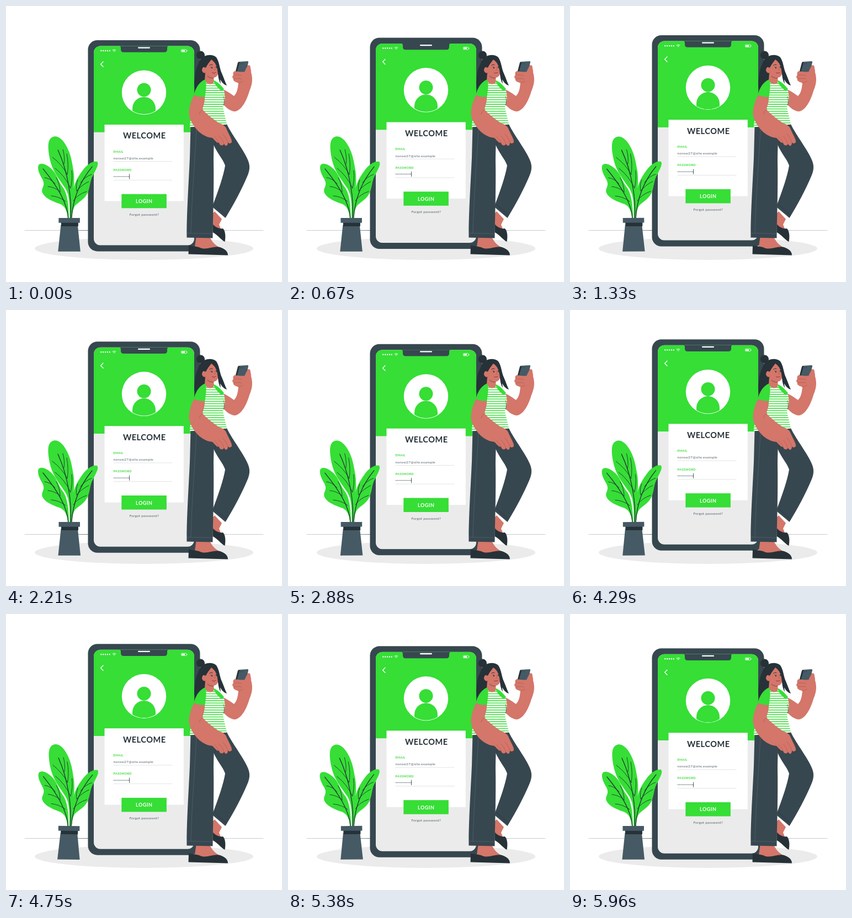
These frames come from a looping animation (500 by 500 pixels, 6000 ms). An HTML page:

```html
<!DOCTYPE html>
<html lang="en">
<head>
<meta charset="utf-8">
<title>Login</title>
<style>
  html, body { margin: 0; width: 100%; height: 100%; overflow: hidden; background: #fff; }
  svg { display: block; width: 100%; height: 100%; }
  text { font-family: Lato, "Open Sans", sans-serif; }
  .green { fill: #36de36; }
  .navy { fill: #37474f; }
  .ink { fill: #263238; }
  .skin { fill: #d4766a; }
  .slate { fill: #455a64; }
  .label { font-size: 5.5px; font-weight: 700; letter-spacing: .3px; }
  .line { fill: none; stroke-linecap: round; stroke-linejoin: round; }
  .vein { stroke: #263238; stroke-width: .9; }
  .crease { stroke: #a9564c; stroke-width: .6; }
  .seam { stroke: #263238; stroke-width: .6; }
  .white { stroke: #fff; }
</style>
</head>
<body>
<svg viewBox="0 0 500 500">
  <defs>
    <clipPath id="screen"><rect x="159" y="72.7" width="182" height="361" rx="12"/></clipPath>
    <clipPath id="disc"><circle cx="250" cy="157" r="39.4"/></clipPath>
    <pattern id="stripes" width="10" height="4.2" patternUnits="userSpaceOnUse">
      <rect width="10" height="4.2" fill="#fff"/>
      <rect class="green" y="1" width="10" height="1.5"/>
    </pattern>
  </defs>

  <ellipse cx="250" cy="439.3" rx="198" ry="20.6" fill="#ebebeb"/>
  <ellipse class="ink" cx="250" cy="406.4" rx="218.4" ry=".3"/>

  <g id="device">
    <rect class="navy" x="148.5" y="62.2" width="203" height="382.5" rx="17"/>
    <g clip-path="url(#screen)">
      <rect x="159" y="72" width="182" height="362" fill="#ebebeb"/>
      <rect class="green" x="159" y="72" width="182" height="157"/>
      <path class="navy" d="M204 72Q208 72.5 208 76V79Q208 84 213 84H287Q292 84 292 79V76Q292 72.5 296 72Z"/>
    </g>
    <rect x="239" y="74.7" width="22" height="2.3" rx="1.1" fill="#fff"/>
    <path class="line white" stroke-width="2.4" stroke-dasharray="0 3.85" d="M172.3 81.3H188"/>
    <path class="line white" stroke-width=".9" d="M193 80.2Q196 77.9 199 80.2M194.5 81.8Q196 80.6 197.5 81.8M196 83.2V83.3"/>
    <rect x="317.5" y="79.2" width="9.6" height="4.4" rx="1" fill="none" stroke="#fff" stroke-width=".7"/>
    <path fill="#fff" d="M318.4 80.1H324V82.8H318.4ZM327.5 80.4H328.4V82.4H327.5Z"/>
    <path class="line white" stroke-width="1.4" d="M176 101.2L171.6 105.7L176 110.2"/>

    <circle cx="250" cy="157" r="40.2" fill="#fff"/>
    <g class="green" clip-path="url(#disc)">
      <circle cx="250" cy="152.3" r="12.5"/>
      <path d="M229 200V186A21 21 0 0 1 271 186V200Z"/>
    </g>

    <rect x="178.5" y="215.2" width="143.3" height="138.4" fill="#fff"/>
    <text class="ink" x="250.8" y="240.7" text-anchor="middle" font-size="14.6" font-weight="700" letter-spacing=".5">WELCOME</text>
    <text class="label green" x="194.6" y="266">EMAIL</text>
    <text x="194.6" y="278.3" font-size="6.5" letter-spacing=".3" fill="#55636a">noraw27@site.example</text>
    <text class="label green" x="194.6" y="299.4">PASSWORD</text>
    <path class="line" stroke="#37474f" stroke-width="1.5" stroke-dasharray="0 2.65" d="M195.8 309.3H222.5"/>
    <path class="line" stroke="#263238" stroke-width=".8" d="M223.5 305V313.5"/>
    <path class="line" stroke="#c4c8ca" stroke-width=".5" d="M195 281.9H301M195 315.7H301"/>
    <rect class="green" x="209.3" y="341" width="81.6" height="25.5"/>
    <text x="250.3" y="357.5" text-anchor="middle" font-size="9" font-weight="700" letter-spacing=".5" fill="#fff">LOGIN</text>
    <text x="250.3" y="380.2" text-anchor="middle" font-size="6.5" letter-spacing=".2" fill="#55636a">Forgot password?</text>
  </g>

  <g id="plant">
    <g class="green">
      <path d="M112 385C111 372 108 364 99 359C86 354 70 349 65.5 337C64 328 72 326 66 314C60 304 55 292 60 287C68 282 85 294 91 307C95 315 98 322 104 330C112 342 114 365 114 385Z"/>
      <path d="M118 385C118 368 117 352 121 336C124 320 130 310 138 299C145 288 157 280 165 282C169 286 163 296 158 306C152 316 153 324 149 336C144 350 131 355 125 362C121 368 120 376 119.500 385Z"/>
      <path d="M115.500 385C115 362 116 345 108 331C99 317 84 301 79 276C76 260 74 243 83 238C91 233 101 240 107 250C116 264 119 279 121 292C124 306 124 320 122 333C119 350 118 368 118 385Z"/>
    </g>
    <g class="line vein">
      <path stroke-width="1.3" d="M113 385C111 356 93 327 67 295M116.800 385C120 350 112 300 94 261M118.800 385C121 350 132 320 156 291"/>
      <path d="M108 354Q96 345 82 344M99 337Q88 328 76 327M89 322Q80 312 70 311M98 335Q97 321 91 311"/>
      <path d="M116.800 330Q107 308 89 294M111 305Q101 287 84 274M116.800 330Q121 316 119 298M111 305Q114 288 110 268M105 286Q107 275 103 260"/>
      <path d="M122 353Q130 341 146 336M128 335Q137 324 150 318M135 320Q143 309 155 305M128 335Q126 325 130 315"/>
    </g>
    <path class="slate" d="M99.500 397H130L135 444.700H94.500Z"/>
    <rect class="ink" x="100" y="392" width="31" height="7"/>
    <rect class="slate" x="95.500" y="384" width="38.500" height="8.700"/>
  </g>

  <g id="woman">
    <!-- far leg -->
    <path class="skin" d="M378 372L391 386L386 396L391 408L375 398L374 376Z"/>
    <path class="ink" d="M374.500 395C381 403 390 404 393 403C398 408 398 419 396.500 427C391 425 384 415 374.500 410Z"/>
    <path class="navy" d="M350 218L400 214C410 235 432 262 439 281C443 292 441 300 436 311C427 332 412 361 397.500 384L375 365V360C384 336 394 308 397 289C393 277 382 266 376 251L350 245Z"/>
    <path class="line seam" d="M376 358L400 379.500M378 252Q382 244 377 232"/>

    <!-- near leg -->
    <path class="skin" d="M345 415H371L370 420C374 429 382 435 389 439L360 444L342 436Z"/>
    <path class="ink" d="M331 433.500C340 436 346 435 352 438C363 443 377 434 388 437C396 440 402 444 402 451.500L330.500 449.500Z"/>
    <path class="navy" d="M334.500 218L379 215C377 240 376 260 376 280C377 330 375 380 374.500 420.500L327.500 419.500C327 380 331 320 333 275Z"/>
    <path class="line" stroke="#607078" stroke-width=".5" d="M345 222C342 280 336 360 335 411M328 411.500L374.500 412.500"/>

    <!-- back hair -->
    <circle class="ink" cx="352.500" cy="89" r="7.600"/>
    <path class="ink" d="M357 95C346 105 343 116 342 130C340 139 341 147 343 153C350 149 352 142 361 134L366 100Z"/>

    <!-- raised arm -->
    <path class="skin" d="M390 150C400 153 407 159 413 163C419 157 420 149 421 139C415 138 411 135 412 132C409 129 410 126 413 125C411 121 413 118 418 118L434 119L437 108C441 106 444 112 444 120C447 131 447 140 441 154C436 171 427 189 415 191C406 191 397 183 390 174Z"/>
    <path class="slate" d="M422 101L437.500 100Q439.500 100 439 102L435.500 117Q435 119 433 119L417.500 120.500Q415.500 120.500 416 118.500L420 103Q420.500 101 422 101Z"/>
    <path class="ink" d="M422 101L420 103L416 118.500L417.500 120.500L419 117L423 103Z"/>
    <path class="line" stroke="#263238" stroke-width="1.300" d="M425 104.500H425.100M428.500 104.200H428.600"/>
    <path class="skin" d="M432 120C434 115 437 108 440 107C444 107 443 116 443 121L434 137Q426 140 418 138Q411 136 412 132Q409 129 412 125Q410 121 414 118Q420 119 432 120Z"/>
    <path class="line crease" d="M413 125Q420 124 427 126M413 132Q420 130 427 132M419 138.500Q425 140 429 136"/>

    <!-- neck and top -->
    <path fill="url(#stripes)" d="M358 136L376 136L394 150C398 163 397 173 393 183C395 195 399 206 400 214.500L333 219.500C333 205 338 193 350 185C357 176 359 160 357 140Z"/>
    <path class="green" d="M375 134C383 137 389 143 395 150.500L391 154C385 150 379 144 375 134Z"/>
    <path class="skin" d="M361 121L377 127L376 139C371 144 363 141 360 135Z"/>
    <path class="line seam" d="M394 164Q397 172 394 180"/>

    <!-- resting arm -->
    <path class="skin" d="M342 158L360 161C361 172 358 180 356 187C362 195 374 204 386 212C393 214 399 219 400 224C404 233 410 242 409 247C406 250 403 249 402 247C402 254 398 255 395 250C391 255 387 252 386 248C381 248 378 243 374 239C362 238 350 231 341 218C333 207 330 197 332 188C333 177 338 167 342 158Z"/>
    <path class="line crease" d="M402 247Q399 238 393 232M395 250Q392 241 386 235M386 248Q384 242 378 237M356 187Q352 190 350 196"/>
    <path class="green" d="M361 133C350 137 343 149 340.500 161Q350 166 360.500 164.500C362 153 364 143 361 133Z"/>

    <!-- head -->
    <path class="skin" d="M361 98C370 92 383 95 385 104C386 113 386 123 381 128C376 132 367 128 362 121C357 123 353 117 356 112Q358 109 361 112Z"/>
    <path class="ink" d="M352 97C359 88 373 86 381 93C387 102 387 114 391 122C395 131 397 138 400 144C394 142 391 138 388 133L389 141C383 132 385 119 381 108C379 103 376 100 372 97C368 102 364 107 362 112C359 108 356 111 355 115L349 119C347 110 348 102 352 97Z"/>
    <path class="line" stroke="#263238" stroke-width=".9" d="M368.500 107.500Q371 105 374 106.500M380 106Q382 104.500 384 105.500M371 110.500L374 111.500M380 110L382.500 110"/>
    <path class="line" stroke="#263238" stroke-width="1.700" d="M372.800 112V112.500M381.300 111V111.500"/>
    <path class="line crease" d="M378 111Q380 116 377 117"/>
    <path class="line" stroke="#7d3039" stroke-width=".9" d="M373.500 121Q377 123 380 120.500"/>
    <path class="line seam" d="M365 127Q369 131 375 130.500"/>
  </g>
</svg>
<script>
  const device = document.getElementById('device');
  const plant = document.getElementById('plant');
  const LEAD = 42;

  // Linear triangle wave: 0 -> 1 -> 0 over one period.
  const rise = p => 1 - Math.abs(1 - 2 * p);
  // Linear swing: 0 -> 1 -> -1 -> 0 over one period.
  const swing = p => p < .25 ? 4 * p : p < .75 ? 2 - 4 * p : 4 * p - 4;

  function draw(now) {
    const t = (now + LEAD) % 6000;
    device.setAttribute('transform', `translate(0 ${-10 * rise(t / 3000 % 1)})`);
    plant.setAttribute('transform', `rotate(${swing(t / 1500 % 1)} 112 340)`);
  }

  const start = performance.now();
  function tick() {
    draw(performance.now() - start);
    requestAnimationFrame(tick);
  }
  tick();
</script>
</body>
</html>
```
